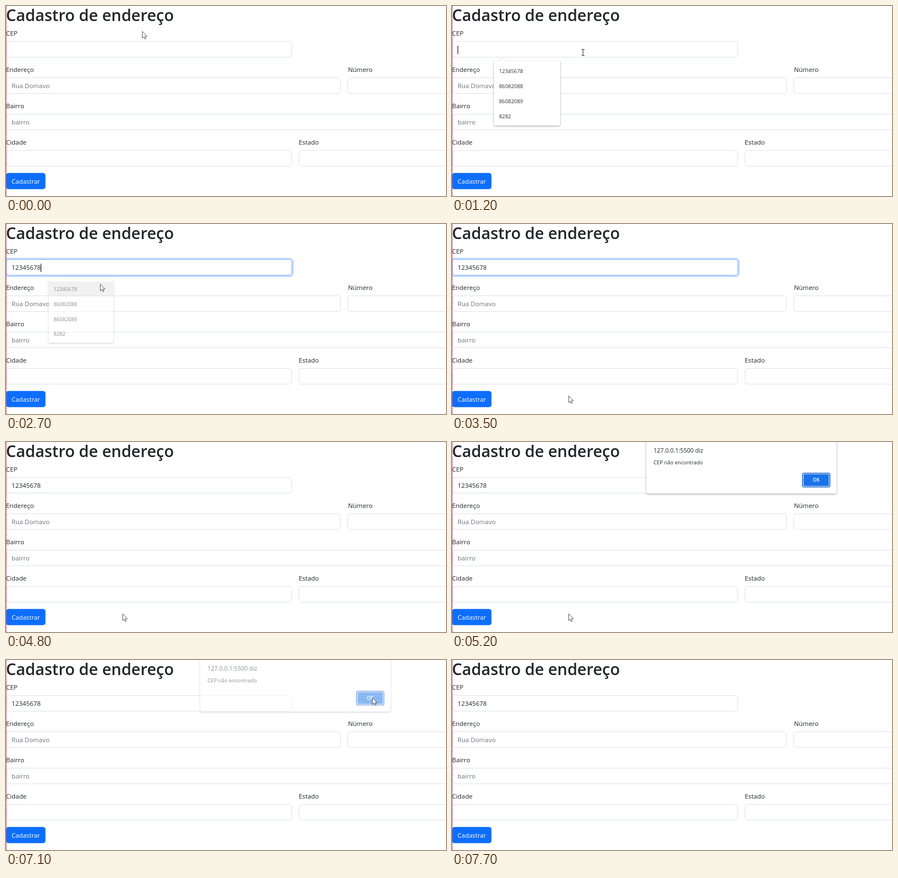
An HTML page for the animation above (8.1 s loop, 786 by 340 pixels).

```html
<!DOCTYPE html>
<html lang="pt-BR">
<head>
<meta charset="utf-8">
<title>Cadastro de endereço</title>
<style>
  html, body { margin: 0; width: 100%; height: 100%; overflow: hidden; background: #fff; }
  svg { display: block; width: 786px; height: 340px; font: 11.4px "Open Sans", "Noto Sans", sans-serif; fill: #212529; }
  .field { fill: #fff; stroke: #dee2e6; }
  .hint { fill: #6c757d; }
  .panel { fill: #fff; filter: drop-shadow(0 1px 1.5px #0006); }
  #menu text { font-size: 9.4px; fill: #303234; }
  #menu { transform-origin: 134px 157px; }
  #arrow { fill: #fff; stroke: #333; }
</style>
</head>
<body>
<svg viewBox="0 0 786 340">
  <text y="27" font-size="28.45" font-weight="600">Cadastro de endereço</text>
  <g id="form"></g>
  <rect id="halo" x="-1.5" y="62" width="514" height="31.5" rx="6" fill="none" stroke="#0d6efd" stroke-opacity=".25" stroke-width="3"/>
  <rect id="cep" class="field" x=".5" y="63.5" width="510" height="28" rx="4.5"/>
  <text id="value" x="10" y="82"></text>
  <rect id="caret" y="71" width="1" height="15" fill="#000"/>
  <text class="hint" x="10" y="147">Rua Domavo</text>
  <text class="hint" x="10" y="212">bairro</text>
  <rect y="298.7" width="70.5" height="29.1" rx="4.6" fill="#0d6efd"/>
  <text x="10" y="318" font-size="11.2" fill="#fff">Cadastrar</text>
  <path d="M.8 0V340" stroke="#b25560" stroke-width="1.5" stroke-dasharray="1.54"/>

  <g id="menu">
    <path class="panel" d="M77 98H86L91 93 96 98H191q2 0 2 2V212q0 2-2 2H77q-2 0-2-2V100q0-2 2-2Z"/>
    <rect id="hover" x="75" y="102" width="118" height="27" fill="#e7e7e7"/>
  </g>

  <g id="dialog">
    <rect class="panel" x="347" y="-10" width="340" height="102.5" rx="3"/>
    <text x="360" y="18.5" font-size="10.6">127.0.0.1:5500 diz</text>
    <text x="360" y="40" font-size="9.3">CEP não encontrado</text>
    <rect x="626.2" y="55.7" width="48.8" height="24.8" rx="3" fill="#fff" stroke="#1a63c8" stroke-width="1.6"/>
    <rect x="628" y="57.5" width="45.2" height="21.2" rx="2" fill="#1a73e8"/>
    <text x="650.5" y="71" font-size="8.5" font-weight="600" fill="#fff" text-anchor="middle">OK</text>
  </g>

  <g id="cursor">
    <path id="arrow" stroke-width=".8" stroke-linejoin="round" d="M.5 .5V12.5L3.2 10 5 14.2 6.9 13.4 5.1 9.3H8.8Z"/>
    <path id="beam" fill="none" stroke="#222" d="M-2.5-5.5H-.8L0-5 .8-5.5H2.5M0-5V5M-2.5 5.5H-.8L0 5 .8 5.5H2.5"/>
  </g>
</svg>
<script>
const $ = id => document.getElementById(id);
const add = (id, markup) => $(id).insertAdjacentHTML('beforeend', markup);
const show = (id, on) => $(id).setAttribute('opacity', +on);
const ramp = (t, a, b) => Math.min(1, Math.max(0, (t - a) / (b - a)));

const label = (x, y, text) => add('form', `<text x="${x}" y="${y}">${text}</text>`);
const field = (x, y, w) => add('form', `<rect class="field" x="${x}" y="${y}" width="${w}" height="28" rx="4.5"/>`);

label(0, 53, 'CEP');
label(0, 118, 'Endereço');
label(611, 118, 'Número');
label(0, 183, 'Bairro');
label(0, 248, 'Cidade');
label(523, 248, 'Estado');
field(.5, 128.5, 597);
field(610.5, 128.5, 260);
field(.5, 193.5, 870);
field(.5, 258.5, 510);
field(523.5, 258.5, 347);

['12345678', '86082088', '86082089', '8282'].forEach((s, i) =>
  add('menu', `<text x="84" y="${119.5 + 27.2 * i}">${s}</text>`));

// Pointer path: time, x, y
const path = [
  [0, 243, 45], [300, 243, 45], [900, 234, 83], [1500, 234, 83], [1900, 174, 104],
  [2200, 168, 107], [2700, 168, 107], [3500, 208, 307], [5600, 208, 307],
  [6000, 540, 46], [6500, 646, 68], [6800, 654, 67], [7100, 654, 67], [7700, 530, -20]
];

function pointer(t) {
  const i = path.findIndex(p => p[0] > t);
  if (i < 0) return path.at(-1).slice(1);
  const [a, b] = [path[i - 1], path[i]], k = ramp(t, a[0], b[0]);
  return [a[1] + (b[1] - a[1]) * k, a[2] + (b[2] - a[2]) * k];
}

function draw(t) {
  const [x, y] = pointer(t);
  const open = t >= 1200 && t < 2800, filled = t >= 2700;
  const hover = open && x < 193 && y > 98;
  const preview = hover && !filled;
  const focus = ramp(t, 1200, 1400) * (1 - ramp(t, 3600, 3800));
  const overField = [63, 128, 193, 258].some(top => y > top && y < top + 29);
  const beam = overField && !hover && t < 4900;

  $('cursor').setAttribute('transform', `translate(${x} ${y})`);
  show('arrow', !beam);
  show('beam', beam);

  show('halo', focus);
  $('cep').style.stroke = `color-mix(in srgb, #86b7fe ${focus * 100}%, #dee2e6)`;
  $('cep').style.fill = preview ? '#e8f0fe' : '#fff';
  $('value').textContent = preview || filled ? '12345678' : '';
  $('value').setAttribute('font-size', preview ? 9.8 : 11.4);
  $('value').setAttribute('fill', preview ? '#000' : '#212529');

  const blink = (t >= 1200 && t < 1700) || (t >= 2700 && t < 3200);
  show('caret', blink && !preview);
  $('caret').setAttribute('x', filled ? 62 : 10);

  show('menu', open && (filled ? .55 : 1));
  $('menu').style.transform = filled ? 'scale(.98)' : '';
  show('hover', hover);

  show('dialog', ramp(t, 4800, 5000) * (1 - ramp(t, 7000, 7200)));
}

function frame(now) {
  draw(Math.floor(now % 8100 / 100) * 100);
  requestAnimationFrame(frame);
}
draw(0);
requestAnimationFrame(frame);
</script>
</body>
</html>
```
